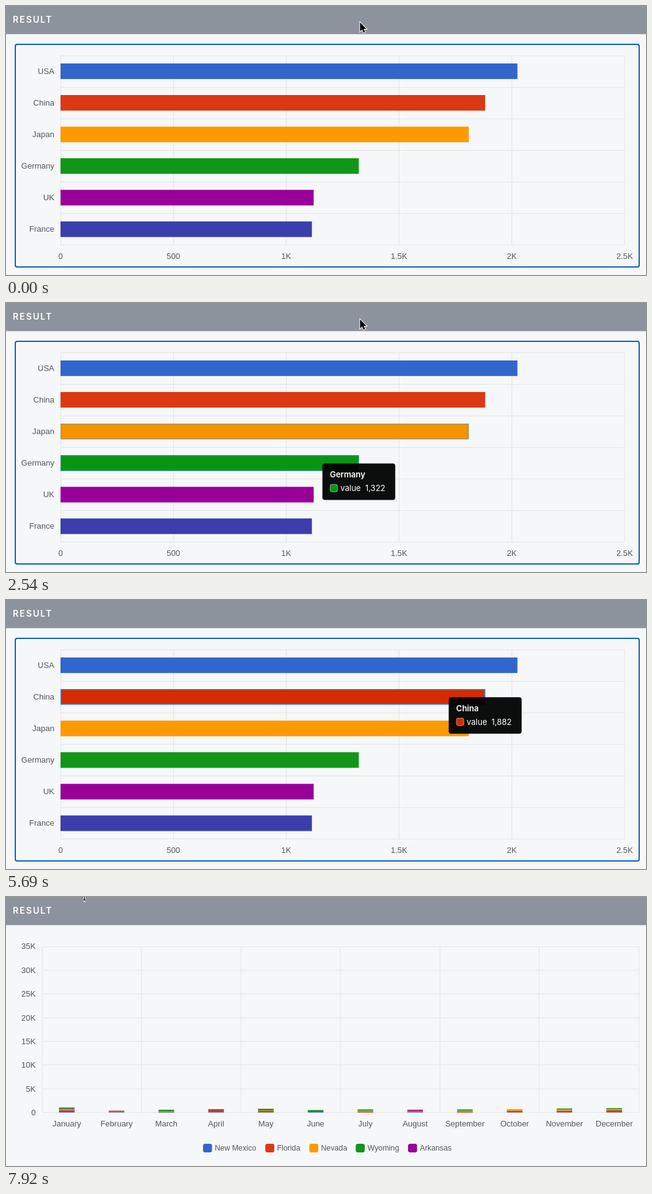
An HTML page with a canvas that plays this animation: 1033x435 px, repeating every 8000 ms.

```html
<!DOCTYPE html>
<html lang="en">
<head>
<meta charset="utf-8">
<title>Result charts</title>
<style>
html, body { margin: 0; width: 100%; height: 100%; overflow: hidden; background: #f6f7f9; }
canvas { display: block; }
</style>
</head>
<body>
<canvas id="stage" width="1033" height="435"></canvas>
<script>
const ctx = document.getElementById('stage').getContext('2d');
const LOOP = 8000, SWAP = 6590;
const SANS = '"Liberation Sans", Arial, sans-serif';
const UI = 'Inter, sans-serif';
const INK = '#555659', BORDER_HOT = [28, 135, 229];

const bars = [
  ['USA', 2025, [51, 102, 204], [11, 68, 218]],
  ['China', 1882, [220, 57, 18], [214, 43, 0]],
  ['Japan', 1809, [255, 153, 0], [230, 138, 0]],
  ['Germany', 1322, [16, 150, 24], [0, 149, 10]],
  ['UK', 1122, [153, 0, 153], [138, 0, 138]],
  ['France', 1114, [59, 62, 172], [28, 32, 181]]
].map(([name, value, base, hot], i) =>
  ({ name, value, base, hot, end: 88 + value * 0.3642, mid: 105.5 + i * 51.1 }));

// [time, hovered bar]
const hovers = [[116, 0], [1480, 1], [1940, 2], [2324, 3], [2700, 4], [3100, 5],
  [3690, 4], [3890, 3], [4120, 2], [4450, 1]];

const months = ['January', 'February', 'March', 'April', 'May', 'June', 'July',
  'August', 'September', 'October', 'November', 'December'];
// one digit per series, in half pixels
const stacks = ['53242', '24000', '13140', '56000', '14250', '50030',
  '03340', '24003', '03340', '14410', '15430', '16430'];
const legend = [['New Mexico', 318], ['Florida', 418.5], ['Nevada', 489.5],
  ['Wyoming', 564.5], ['Arkansas', 649]];

const clamp = x => Math.max(0, Math.min(1, x));
const outQuart = x => 1 - (1 - clamp(x)) ** 4;
const lerp = (a, b, p) => a + (b - a) * p;
const rgb = c => `rgb(${c.map(Math.round)})`;
const mix = (a, b, p) => rgb(a.map((v, i) => lerp(v, b[i], p)));

function rect(x, y, w, h, color) {
  ctx.fillStyle = color;
  ctx.fillRect(x, y, w, h);
}

function round(x, y, w, h, r, fill, stroke, width = 1) {
  ctx.beginPath();
  ctx.roundRect(x, y, w, h, r);
  if (fill) { ctx.fillStyle = fill; ctx.fill(); }
  if (stroke) { ctx.strokeStyle = stroke; ctx.lineWidth = width; ctx.stroke(); }
}

function text(str, x, y, { align = 'left', color = INK, font = '13px ' + SANS, gap = 0 } = {}) {
  ctx.font = font;
  ctx.textAlign = align;
  ctx.letterSpacing = gap + 'px';
  ctx.fillStyle = color;
  ctx.fillText(str, x, y);
}

function grid(x, y, w, h, cols, rows) {
  for (let i = 0; i <= cols; i++) rect(Math.floor(x + w * i / cols), y, 1, h, '#e3e4e7');
  for (let i = 0; i <= rows; i++) rect(x, Math.floor(y + h * i / rows), w, 1, '#e3e4e7');
}

// Replays the hovers up to t: tooltip place and heat of each bar
function hoverState(t) {
  let x = bars[5].end, y = bars[5].mid, active = -1;
  const heat = bars.map(() => 0);
  hovers.forEach(([start, index], n) => {
    if (t < start) return;
    const spent = Math.min(t, n + 1 < hovers.length ? hovers[n + 1][0] : LOOP) - start;
    const p = outQuart(spent / 200);
    x = lerp(x, bars[index].end, p);
    y = lerp(y, bars[index].mid, p);
    heat.forEach((v, i) => { heat[i] = clamp(v + (i === index ? spent : -spent) / 450); });
    active = index;
  });
  return { x, y, active, heat };
}

function tooltip({ x, y, active, heat }, alpha) {
  const bar = bars[active], value = bar.value.toLocaleString('en-US');
  const font = '13px ' + UI, color = '#fff';
  ctx.font = font;
  ctx.letterSpacing = '0px';
  const w = 85 + ctx.measureText(value).width, left = x - w / 2;
  ctx.globalAlpha = alpha;
  round(left, y + 0.1 + 0.5, w, 59, 4, 'rgba(0,0,0,0.95)');
  text(bar.name, left + 12, y + 23.5, { color, font: '600 ' + font });
  round(left + 12.5, y + 34.5, 12, 12, 3, mix(bar.base, bar.hot, heat[active]), 'rgba(255,255,255,0.5)');
  text('value', left + 29, y + 45, { color, font });
  text(value, left + 69, y + 45, { color, font });
  ctx.globalAlpha = 1;
}

function countryChart(t) {
  round(15, 62, 1007, 360, 3, null, '#0b60c4', 2);
  grid(88, 80, 910.5, 306.6, 5, 6);
  ['0', '500', '1K', '1.5K', '2K', '2.5K'].forEach((s, i) =>
    text(s, 88 + i * 182.1, 408.5, { align: 'center' }));
  const state = hoverState(t);
  bars.forEach((b, i) => {
    const h = state.heat[i], top = b.mid - 12.6;
    text(b.name, 78, b.mid + 4, { align: 'right' });
    rect(88, top, b.end - 88, 25.2, mix(b.base, b.hot, h));
    if (h > 0) {
      ctx.strokeStyle = mix(b.base, BORDER_HOT, h);
      ctx.lineWidth = 1.5;
      ctx.strokeRect(88.75, top + 0.75, b.end - 89.5, 23.7);
    }
  });
  if (state.active >= 0) tooltip(state, clamp((t - hovers[0][0]) / 180));
}

function monthChart(t) {
  const grow = outQuart((t - SWAP) / 1150);
  grid(58, 80, 963.5, 268.5, 6, 7);
  for (let i = 0; i < 8; i++)
    text(i ? i * 5 + 'K' : '0', 48, 353 - i * 38.36, { align: 'right' });
  months.forEach((name, i) => {
    const x = 98.1 + i * 80.33;
    text(name, x, 370.5, { align: 'center' });
    let y = 348.5;
    [...stacks[i]].forEach((d, k) => {
      const h = d / 2 * grow;
      y -= h;
      rect(x - 12.6, y, 25.2, h, rgb(bars[k].base));
    });
  });
  legend.forEach(([name, x], k) => {
    round(x, 399, 14.5, 14, 3.5, rgb(bars[k].base));
    text(name, x + 19, 410, { font: '12.25px ' + SANS });
  });
}

function arrow() {
  const shape = new Path2D('M571.5 26.5V41l3.3-3 2.4 5.2 2.4-1.1-2.4-5h4.4z');
  ctx.lineWidth = 2;
  ctx.strokeStyle = '#fff';
  ctx.stroke(shape);
  ctx.fillStyle = '#000';
  ctx.fill(shape);
}

function beam() {
  const shape = new Path2D('M126.5 0V5M123.5 6.5Q126.5 6.5 126.5 4.5Q126.5 6.5 129.5 6.5M125 3.5H128');
  [[3, '#fff'], [1, '#000']].forEach(([width, color]) => {
    ctx.lineWidth = width;
    ctx.strokeStyle = color;
    ctx.stroke(shape);
  });
}

// The picture advances in steps of 150 ms
function step(t) {
  const from = t < 1490 ? 0 : t < 7620 ? 1490 : 7620;
  return from + Math.floor((t - from) / 150) * 150;
}

function draw(now) {
  const t = step(now % LOOP);
  rect(0, 0, 1033, 435, '#f6f7f9');
  rect(0, 0, 1033, 45.5, '#8d939d');
  text('RESULT', 11, 27, { color: '#fff', font: '600 14px ' + UI, gap: 1.9 });
  if (t < SWAP) countryChart(t); else monthChart(t);
  if (t < 5690) arrow();
  if (t >= 7920) beam();
}

const began = performance.now();
function frame() {
  draw(performance.now() - began);
  requestAnimationFrame(frame);
}
frame();
</script>
</body>
</html>
```
